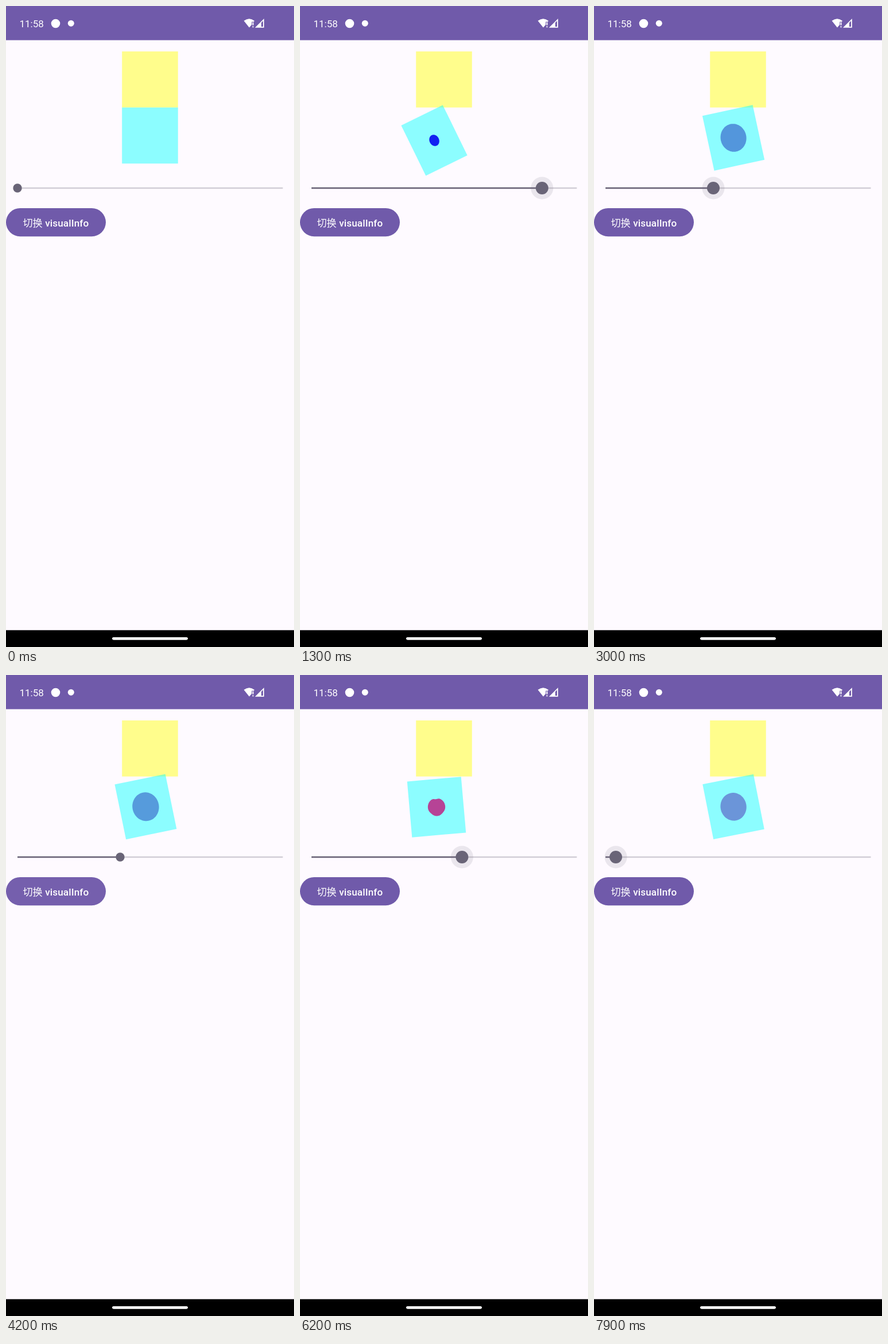
An HTML page for the animation above (8000 ms loop, 502 by 1116 pixels).

```html
<!DOCTYPE html>
<html lang="zh">
<head>
<meta charset="utf-8">
<style>
  html, body { margin: 0; width: 100%; height: 100%; overflow: hidden; background: #fefaff; }
  svg { display: block; width: 100%; height: 100%; }
  text { fill: #fff; font-family: Roboto, "Noto Sans CJK SC", "Noto Sans CJK", sans-serif; }
</style>
</head>
<body>
<svg viewBox="0 0 502 1116">
  <rect width="502" height="1116" fill="#fefaff"/>

  <!-- status bar -->
  <rect width="502" height="59.5" fill="#705aaa"/>
  <text x="23.5" y="37" font-size="17">11:58</text>
  <g fill="#fff">
    <circle cx="86.5" cy="30.5" r="7.8"/>
    <circle cx="113.3" cy="30.2" r="5.5"/>
    <path d="M414.6 25.8Q424 18.6 433 25.8L432 27.5H428.3V32.5L424 37.6Z"/>
    <path d="M429.5 28.5h2v5h-2zM429.5 35.2h2v2h-2z"/>
    <path fill-rule="evenodd" d="M434 37.8L449.8 22V37.8ZM445 29V36H448V26Z"/>
  </g>

  <rect x="202.2" y="79.1" width="97.6" height="97.6" fill="#ff0" fill-opacity=".45"/>
  <g id="box">
    <rect x="-48.8" y="-48.8" width="97.6" height="97.6" fill="#0ff" fill-opacity=".45"/>
    <path id="blob"/>
  </g>

  <!-- slider -->
  <g stroke-width="2.4">
    <path d="M20 317H482.5" stroke="#d1cdd6"/>
    <path id="active" stroke="#686276"/>
  </g>
  <circle id="halo" cy="317" r="19.5" fill="#625b71"/>
  <circle id="thumb" cy="317" fill="#696477"/>

  <!-- button -->
  <rect y="352" width="174" height="49.2" rx="24.6" fill="#705aaa"/>
  <rect id="ripple" y="352" width="174" height="49.2" rx="24.6" fill="#fff"/>
  <text x="29.4" y="384" font-size="17.1" font-weight="500" letter-spacing=".12"><tspan font-weight="400">切换</tspan> visualInfo</text>

  <!-- navigation bar -->
  <rect y="1086.7" width="502" height="30" fill="#000"/>
  <rect x="185" y="1098.9" width="132" height="4.9" rx="2.45" fill="#fff"/>
</svg>
<script>
const LOOP = 8000, STEP = 100, SWITCH = 4300, MIN = 20, MAX = 482, REST = 199;
const $ = id => document.getElementById(id);
const set = (id, attrs) => {
  for (const k in attrs) $(id).setAttribute(k, attrs[k]);
};
const mix = (a, b, p) => a + (b - a) * p;
const smooth = p => p * p * (3 - 2 * p);

// moves: [start, end, value reached], eased at both ends
function follow(moves, value, t) {
  for (const [start, end, to] of moves)
    if (t > start) value = mix(value, to, smooth(Math.min(1, (t - start) / (end - start))));
  return value;
}

const drag = [
  [400, 1535, 472], [2100, 3110, REST], [SWITCH - STEP, SWITCH, MIN],
  [5300, 6950, MAX], [7300, 7880, 38]
];
const press = [[500, 700, 1], [3400, 3900, 0], [5400, 5600, 1]];
const tap = [[4100, 4400, .12], [4400, 4900, 0]];

// rgba: linear-light red, green, blue and plain alpha
const plain = { x: 0, y: 0, turn: 0, sx: 1, round: 37, heart: 0, rgba: [0, 0, 0, 0] };
const blue = { x: -19.5, y: 9.76, turn: -30, sx: .8, round: 6.1, heart: 0, rgba: [0, 0, 1, 1] };
const red = { x: -17.1, y: 4.88, turn: 0, sx: 1, round: 0, heart: 1, rgba: [1, 0, 0, 1] };

function blend(a, b, p) {
  const out = {};
  for (const k in a)
    out[k] = k === 'rgba' ? a.rgba.map((v, i) => mix(v, b.rgba[i], p)) : mix(a[k], b[k], p);
  return out;
}
const middle = blend(plain, blue, (REST - MIN) / (MAX - MIN));

// heart radius by angle from the top: a circle with a notch and flattened flanks
const dip = (a, at, width) => Math.exp(-(((a - at) / width) ** 2));
const heartRadius = a => 8.6 - 3.6 * dip(a, 0, .3) - 1.4 * dip(a, 2.36, .4);

function outline({ round, heart }) {
  const points = [];
  for (let i = -40; i < 40; i++) {
    const a = i * Math.PI / 40, r = round + heart * heartRadius(Math.abs(a));
    points.push((r * Math.sin(a)).toFixed(2) + ' ' + (-r * Math.cos(a)).toFixed(2));
  }
  return 'M' + points.join('L') + 'Z';
}

function draw(t) {
  const x = follow(drag, MIN, t), p = (x - MIN) / (MAX - MIN), held = follow(press, 0, t);
  const s = t < SWITCH ? blend(plain, blue, p) : blend(middle, red, p);
  const rgb = s.rgba.slice(0, 3).map(v => Math.round(255 * v ** (1 / 2.2)));

  set('box', { transform: `translate(${251 + s.x} ${225.5 + s.y}) rotate(${s.turn}) scale(${s.sx} 1)` });
  set('blob', { d: outline(s), fill: `rgb(${rgb})`, 'fill-opacity': s.rgba[3] });
  set('active', { d: `M20 317H${x}` });
  set('halo', { cx: x, 'fill-opacity': .13 * held });
  set('thumb', { cx: x, r: mix(7.7, 11, held) });
  set('ripple', { 'fill-opacity': follow(tap, 0, t) });
}

const start = performance.now();
function tick() {
  const t = (performance.now() - start) % LOOP;
  draw(Math.floor(t / STEP) * STEP);
  requestAnimationFrame(tick);
}
tick();
</script>
</body>
</html>
```
